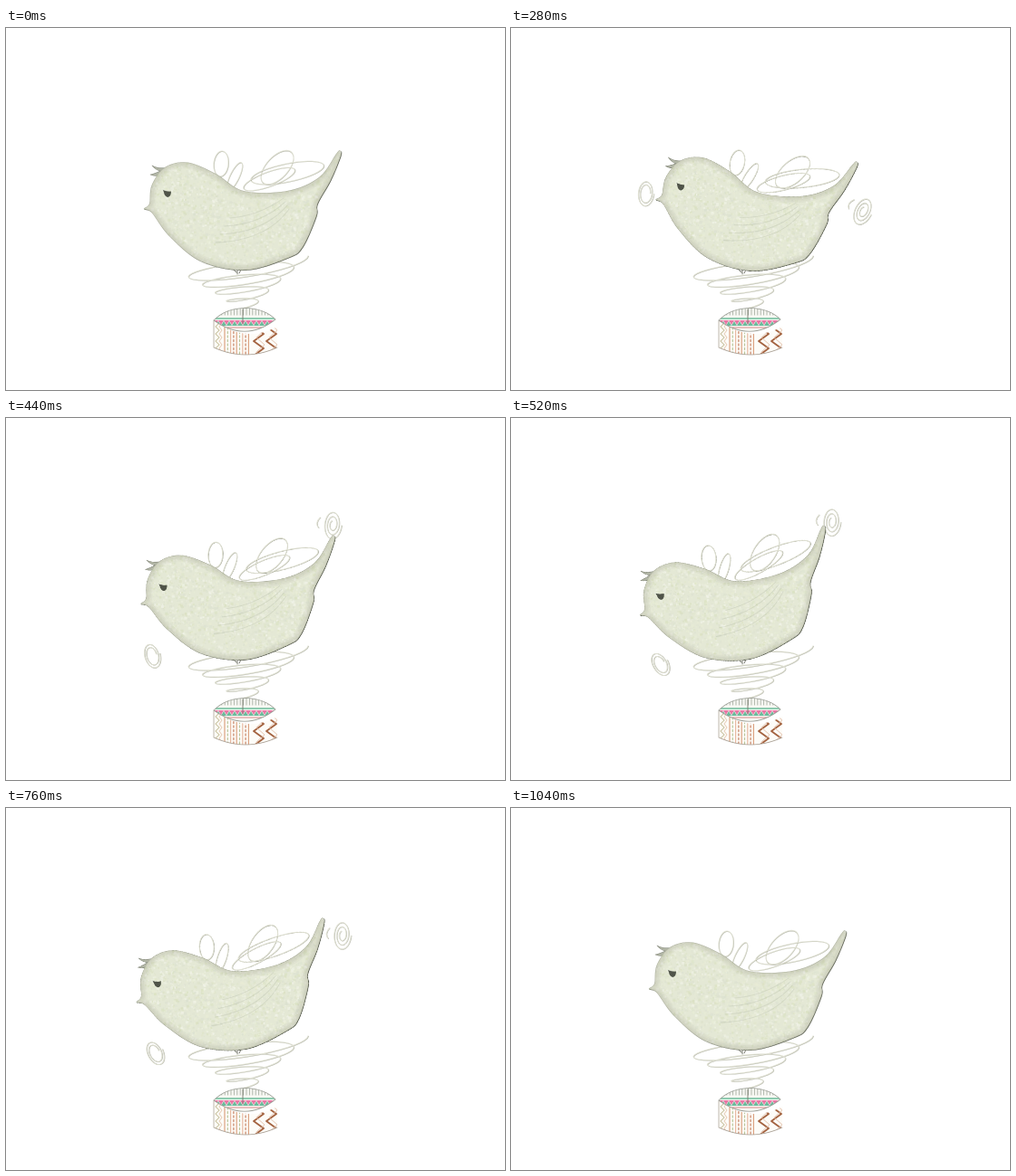
Recreate the animation shown at these times as an HTML page with a canvas. Size 550 by 400 pixels, loop 1120 ms.

```html
<!DOCTYPE html>
<html lang="en">
<head>
<meta charset="utf-8">
<title>Bird on a spring</title>
<style>
html, body { margin: 0; width: 100%; height: 100%; overflow: hidden; background: #fff; }
canvas { display: block; }
</style>
</head>
<body>
<canvas id="stage" width="550" height="400"></canvas>
<script>
const W = 550, H = 400, STEP = 40, LOOP = 1120;
const BACK = 4, DIP = 15, LAST = 26;   // steps of the two turning points and the rest pose
const PIVOT = { x: 256, y: 268.5 };
const DEG = Math.PI / 180, TAU = Math.PI * 2;
const ctx = document.getElementById('stage').getContext('2d');

const mix = (a, b, t) => a + (b - a) * t;

function ramp(from, to, v) {
  const t = Math.max(0, Math.min(1, (v - from) / (to - from)));
  return t * t * (3 - 2 * t);
}

function seeded(s) {
  return () => (s = (s * 16807) % 2147483647) / 2147483647;
}

// Closed smooth curve through points.
function blob(pts) {
  const p = new Path2D(), n = pts.length;
  const at = i => pts[(i + n) % n];
  p.moveTo(...pts[0]);
  for (let i = 0; i < n; i++) {
    const [a, b, c, d] = [-1, 0, 1, 2].map(k => at(i + k));
    p.bezierCurveTo(
      b[0] + (c[0] - a[0]) / 6, b[1] + (c[1] - a[1]) / 6,
      c[0] - (d[0] - b[0]) / 6, c[1] - (d[1] - b[1]) / 6, c[0], c[1]);
  }
  return p;
}

// Elliptic spiral; size(u) scales it and drop moves it down along the way.
function coil(rx, ry, turns, size, drop = 0, slope = 0) {
  const p = new Path2D();
  for (let i = 0, n = turns * 40; i <= n; i++) {
    const u = i / n, a = u * turns * TAU, s = size(u);
    const x = rx * s * Math.cos(a);
    p.lineTo(x, ry * s * Math.sin(a) + drop * u - slope * x);
  }
  return p;
}

function layer(paint) {
  const c = document.createElement('canvas');
  c.width = W * 2;
  c.height = H * 2;
  const g = c.getContext('2d');
  g.scale(2, 2);
  g.lineCap = g.lineJoin = 'round';
  paint(g);
  return c;
}

function stroke(g, path, color, width) {
  g.strokeStyle = color;
  g.lineWidth = width;
  g.stroke(path);
}

function fill(g, path, color) {
  g.fillStyle = color;
  g.fill(path);
}

function placed(g, x, y, turn, paint) {
  g.save();
  g.translate(x, y);
  g.rotate(turn);
  paint();
  g.restore();
}

// Pale thread with a thin darker edge.
function thread(g, path) {
  placed(g, 0.5, 0.4, 0, () => stroke(g, path, 'rgba(105,108,85,.5)', 0.9));
  stroke(g, path, '#dfe0d2', 1);
}

const body = blob([
  [152, 200], [158, 194], [160.5, 174], [175, 154], [200, 148.5], [231, 161],
  [262, 180], [310, 180], [345, 165], [364, 139], [368, 135.5], [369, 141],
  [358, 168], [343.5, 194], [342, 208], [327, 242], [311, 254], [264, 267.5],
  [215, 258], [180, 230], [160.5, 204]
]);
const crest = new Path2D('M178 154Q168 156 161 152Q165 157 170 158Q164 161 159 162Q166 165 171 161Z');
const eye = new Path2D('M173 179Q178 181 182 180.5Q182 186 178.5 187Q174.5 186 174 181.5Z');
const ring = coil(9, 15, 2, u => 1 - 0.45 * u);
const whirl = coil(10, 17, 2.7, u => 1 - 0.75 * u);
const dash = new Path2D('M2 -7Q-4 0 1 5');

// Centre, radii and tilt of the loops behind the back.
const loops = [
  [237, 150, 8, 14, 0.1], [252, 164, 5, 17, 0.45], [299, 154, 12, 23, 0.75],
  [310, 160, 41, 10, -0.2], [290, 167, 30, 8, -0.35]
];

function mottle(g) {
  const rnd = seeded(71), tones = ['#f2f4e9', '#dae1c1', '#dce1d0', '#e9edd6'];
  for (let i = 0; i < 5200; i++) {
    const size = 0.8 + 2.4 * rnd();
    g.globalAlpha = 0.25 + 0.45 * rnd();
    g.fillStyle = tones[i % tones.length];
    g.fillRect(148 + 224 * rnd(), 134 + 136 * rnd(), size, size);
  }
  g.globalAlpha = 1;
}

const bird = layer(g => {
  for (const [x, y, rx, ry, tilt] of loops) {
    placed(g, x, y, tilt, () => thread(g, coil(rx, ry, 1, () => 1)));
  }
  fill(g, crest, '#b2b6a6');
  stroke(g, crest, '#85897b', 0.6);
  placed(g, 0.6, 0.5, 0, () => fill(g, body, '#55594c'));
  fill(g, body, '#e4e8d5');

  g.save();
  g.clip(body);
  mottle(g);
  for (let w = 2; w < 15; w += 3) stroke(g, body, 'rgba(130,138,118,.06)', w);
  stroke(g, body, 'rgba(110,115,100,.4)', 0.8);
  for (let k = 0; k < 4; k++) {
    const feather = new Path2D(`M${246 - 5 * k} ${210 + 9 * k}Q${278 + 3 * k} ${208 + 9 * k} ${306 + 2 * k} ${188 + 4 * k}`);
    stroke(g, feather, 'rgba(155,162,140,.22)', 1);
  }
  g.restore();
  fill(g, eye, '#505449');
});

function zigzag(g, x, top, amp, pitch, color, width) {
  const p = new Path2D();
  for (let i = 0; top + i * pitch < 370; i++) p.lineTo(x + (i % 2) * amp, top + i * pitch);
  stroke(g, p, color, width);
}

function paintDrum(g) {
  const drum = new Path2D('M229 323Q264 349 299 330V353Q264 369 229 353Z');
  fill(g, drum, '#fdfcf8');
  g.save();
  g.clip(drum);
  const tones = ['#dca382', '#b9c69b', '#e8b9a2', '#c58163'];
  for (let k = 0; k < 9; k++) {
    g.setLineDash(k % 2 ? [2, 2.5] : []);
    stroke(g, new Path2D(`M${241 + 3.3 * k} 322V364`), tones[k % tones.length], 1.2);
  }
  g.setLineDash([]);
  zigzag(g, 231, 322, 4, 4, '#c9c3a0', 1);
  zigzag(g, 235, 322, 3, 4, '#e6cbb4', 0.9);
  for (const x of [273, 287]) {
    zigzag(g, x, 330, 11, 8, '#a3623f', 1.8);
    zigzag(g, x + 3, 326, 9, 8, '#e3c0ab', 0.7);
  }
  g.restore();
  stroke(g, new Path2D('M229 323V353Q264 369 299 353'), '#a69c90', 0.7);
}

function paintLid(g) {
  const lid = new Path2D('M229 323Q242 309.5 264 309.5Q285 310 297 322Q264 348 229 323Z');
  fill(g, lid, '#f7f7f2');
  g.save();
  g.clip(lid);
  for (let x = 231; x < 298; x += 3.4) stroke(g, new Path2D(`M${x} 309v8`), '#a9b1a5', 0.9);
  stroke(g, new Path2D('M228 321h70'), '#8fcbb0', 2);
  for (let x = 228; x < 298; x += 6) {
    fill(g, new Path2D(`M${x} 323h6l-3 5Z`), '#ea78a5');
    fill(g, new Path2D(`M${x + 3} 329l3 -5l3 5Z`), '#6cba9b');
  }
  stroke(g, new Path2D('M228 331h70'), '#dfa0a0', 1.2);
  g.restore();
  stroke(g, lid, '#9a9d95', 0.8);
}

const base = layer(g => {
  const spring = coil(70, 12, 5, u => 0.1 + 0.9 * Math.pow(1 - u, 1.3), 54, 0.13);
  placed(g, 263, 261, 0, () => thread(g, spring));
  stroke(g, new Path2D('M251 267l3 3M255 267v5M259 267l-2 4'), '#5b5e52', 0.8);
  paintDrum(g);
  paintLid(g);
  stroke(g, new Path2D('M261 311V327'), '#777a6f', 0.9);
});

// Swing in degrees: quick lean back, accelerating dip, easing return.
function swing(i) {
  if (i <= BACK) return 8.3 * (1 - Math.pow(1 - i / BACK, 1.75));
  if (i <= DIP) return 8.3 - 25.5 * Math.pow((i - BACK) / (DIP - BACK), 1.8);
  return -17.2 * Math.pow((LAST - i) / (LAST - DIP), 1.75);
}

function swirl(side, rise, r, tilt, ...paths) {
  const x = PIVOT.x + side * r * Math.cos(rise * DEG);
  const y = PIVOT.y - r * Math.sin(rise * DEG);
  placed(ctx, x, y, tilt, () => paths.forEach((p, k) => {
    ctx.translate(-16 * k, 0);
    thread(ctx, p);
  }));
}

// The air swirls pass to the other side of the motion, then ride along with the bird.
function swirls(i) {
  const pass = ramp(5.5, 12, i), turn = swing(i);
  const lift = i < DIP ? 17.2 : -turn;
  swirl(-1, mix(44, 2.3 + 0.45 * turn, pass), mix(145, 92, pass),
    mix(0.1, -0.2 + 0.035 * turn, pass), ring);
  swirl(1, mix(22, 40.5 + lift, pass), mix(142, 186, pass) - 14 * ramp(12, DIP, i),
    mix(0.5, 0.05, pass), whirl, dash);
}

function draw(ms) {
  const i = Math.min(LAST, Math.floor((ms % LOOP) / STEP));
  ctx.fillStyle = '#fff';
  ctx.fillRect(0, 0, W, H);
  ctx.drawImage(base, 0, 0, W, H);
  if (i > 0 && i < LAST) swirls(i);
  placed(ctx, PIVOT.x, PIVOT.y, swing(i) * DEG,
    () => ctx.drawImage(bird, -PIVOT.x, -PIVOT.y, W, H));
}

const start = performance.now();
function tick() {
  draw(performance.now() - start);
  requestAnimationFrame(tick);
}
tick();
</script>
</body>
</html>
```
